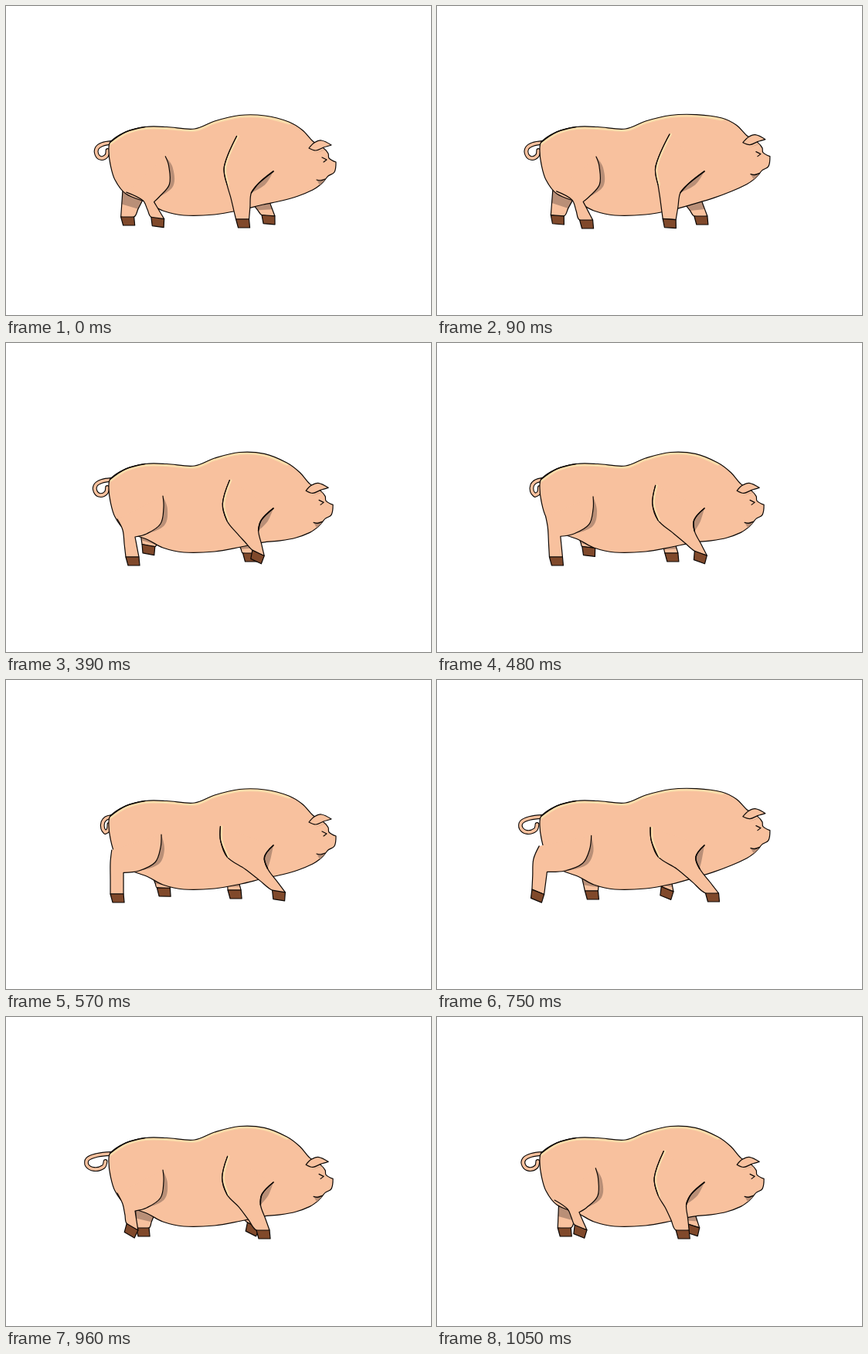
Animation, 550 px wide and 400 px high, one loop 1140 ms. Source, as an HTML page with a canvas:

```html
<!DOCTYPE html>
<html lang="en">
<head>
<meta charset="utf-8">
<title>Walking pig</title>
<style>
html, body { margin: 0; width: 100%; height: 100%; overflow: hidden; background: #fff; }
canvas { display: block; width: 550px; height: 400px; }
</style>
</head>
<body>
<canvas id="stage" width="550" height="400"></canvas>
<script>
const ctx = document.getElementById('stage').getContext('2d');
const SKIN = '#f8c19e', LIGHT = '#fbdcaa', SHADE = '#b98f77', HOOF = '#80492b', INK = '#0c0806';
const LOOP = 1140;
const STEPS = [0, 90, 210, 300, 390, 480, 570, 660, 750, 870, 960, 1050];

// The body at rest.
const BACK = [[135, 176], [155, 163], [180, 156.5], [208, 156.5], [244, 159], [270, 149], [302, 141.5], [335, 142], [366, 150], [384, 161], [397, 175]];
const FACE = [[411, 184], [417, 191], [418, 197], [427, 202], [425, 215], [417, 220], [412, 226], [406, 232], [397, 238]];
const BELLY = [[378, 246], [357, 252], [333, 257], [304, 264], [270, 270], [230, 271], [203, 265], [184, 255]];
const RUMP = [[155, 243], [141, 225], [135, 205], [133, 188]];
const EAR = [[392, 184], [399, 177], [408, 174], [421, 180], [411, 183], [401, 187]];
const EYE = [[409, 196], [415, 199], [411, 202]];
const MOUTH = [[402, 225], [407, 226], [413, 224]];

// foot: mean x, reach, step of the farthest reach, ground, lift, skew of the swing.
// Each joint is [x, x per foot shift, y, y per foot shift].
const LEGS = {
  farHind: {
    x: 181, reach: 25, peak: 6.7, ground: 284, lift: 11, skew: 0, tilt: 0.2,
    front: [[195, 0.75, 257, 0.3]],
    rear: [[171, 0.85, 247, 0.45]]
  },
  farFore: {
    x: 318, reach: 24, peak: 0.8, ground: 283, lift: 2, skew: 0, tilt: 0.5,
    front: [[321, 0.9, 257, -0.2]],
    rear: [[303, 0.75, 260, -0.15]]
  },
  hind: {
    x: 164, reach: 33, peak: 1, ground: 288, lift: 5, skew: 0.46, tilt: 0.55,
    front: [[203, 0.1, 198, -0.1], [204, 0.2, 213, -0.2], [200, 0.35, 234, -0.1], [182, 0.5, 247, 0], [167, 0.75, 251, 0.08]],
    rear: [[151, 0.8, 242, 0.3], [144, 0.36, 228, 0.4]]
  },
  fore: {
    x: 330, reach: 29, peak: 7.2, ground: 287, lift: 4, skew: 0, tilt: 0.45,
    front: [[346, 0, 214, 0], [331, 0.15, 229, 0], [328, 0.45, 243, 0.05]],
    rear: [[300, 0.4, 246, -0.05], [286, 0, 230, -0.05], [280, -0.1, 208, 0], [288, -0.45, 179, 0.45]]
  }
};

const angle = (step, peak, perLoop = 1) => 2 * Math.PI * perLoop * (step - peak) / STEPS.length;
const mix = (a, b, k) => [a[0] + (b[0] - a[0]) * k, a[1] + (b[1] - a[1]) * k];
const shift = (pts, dx, dy) => pts.map(([x, y]) => [x + dx, y + dy]);

// The head nods twice per loop; the neck eases the nod into the body.
function nod(pts, step) {
  const bob = Math.cos(angle(step, 4.5, 2));
  return pts.map(([x, y]) => {
    const t = Math.min(1, Math.max(0, (x - 310) / 90));
    const w = t * t * (3 - 2 * t) * bob;
    return [x - 4.5 * w, y + 8.5 * w];
  });
}

function tailAt(step) {
  const width = 24 - 8 * Math.cos(angle(step, 0, 2)) - 6 * Math.sin(angle(step, 1.5));
  return [[0, 177], [0.55, 179], [0.9, 184], [0.92, 192], [0.65, 197], [0.3, 194], [0.22, 187]]
    .map(([k, y]) => [136 - k * width, y]);
}

// Hoof corners: rear top, front top, front bottom, rear bottom.
function hoofAt(x, y, tilt) {
  const c = Math.cos(tilt), s = Math.sin(tilt);
  return [[-9, 0], [8, 0], [9, 11], [-6, 11]].map(([u, v]) => [x + u * c - v * s, y - 11 + u * s + v * c]);
}

function legAt(leg, step) {
  const a = angle(step, leg.peak);
  const d = leg.reach * Math.cos(a + leg.skew * Math.cos(a));
  const swing = Math.max(0, -Math.sin(a));
  const toe = Math.max(0, Math.cos(angle(step, leg.peak - 3.5)));
  const hoof = hoofAt(leg.x + d, leg.ground - leg.lift * swing, leg.tilt * toe);
  const joint = ([x, kx, y, ky]) => [x + kx * d, y + ky * d];
  const front = leg.front.map(joint), rear = leg.rear.map(joint);
  const frontAnkle = mix(front.at(-1), hoof[1], 0.55), rearAnkle = mix(rear[0], hoof[0], 0.55);
  return { front, rear, hoof, outline: [...front, frontAnkle, hoof[1], hoof[0], rearAnkle, ...rear], frontAnkle, rearAnkle };
}

// Smooth curve through points; sharp turns stay corners.
function curve(pts, closed) {
  const n = pts.length, path = new Path2D();
  const at = i => closed ? pts[(i + n) % n] : pts[Math.max(0, Math.min(n - 1, i))];
  const unit = (a, b) => {
    const d = Math.hypot(b[0] - a[0], b[1] - a[1]) || 1;
    return [(b[0] - a[0]) / d, (b[1] - a[1]) / d];
  };
  const tangent = i => {
    const u = unit(at(i - 1), at(i)), v = unit(at(i), at(i + 1));
    return u[0] * v[0] + u[1] * v[1] < 0.35 ? [0, 0] : unit(at(i - 1), at(i + 1));
  };
  path.moveTo(...pts[0]);
  for (let i = 0; i < (closed ? n : n - 1); i++) {
    const a = at(i), b = at(i + 1), s = tangent(i), e = tangent(i + 1);
    const h = Math.hypot(b[0] - a[0], b[1] - a[1]) / 3;
    path.bezierCurveTo(a[0] + s[0] * h, a[1] + s[1] * h, b[0] - e[0] * h, b[1] - e[1] * h, b[0], b[1]);
  }
  if (closed) path.closePath();
  return path;
}

function polygon(pts) {
  const path = new Path2D();
  pts.forEach(p => path.lineTo(...p));
  path.closePath();
  return path;
}

function fill(path, color) {
  ctx.fillStyle = color;
  ctx.fill(path);
}

function line(path, width = 1.2, color = INK) {
  ctx.lineWidth = width;
  ctx.strokeStyle = color;
  ctx.stroke(path);
}

function drawLeg(leg, far) {
  const skin = curve(leg.outline), hoof = polygon(leg.hoof);
  fill(skin, SKIN);
  if (far) fill(polygon([leg.front[0], leg.frontAnkle, leg.rearAnkle, leg.rear[0]]), SHADE);
  line(skin);
  fill(hoof, HOOF);
  line(hoof);
}

// Crescent to the right of a fold, widest at the middle.
function foldShade(pts, dx) {
  const inner = shift(pts.slice(1, -1), dx, 2).reverse();
  fill(curve([...pts, ...inner], true), SHADE);
}

function draw(step) {
  ctx.fillStyle = '#fff';
  ctx.fillRect(0, 0, 550, 400);
  const legs = {};
  for (const name in LEGS) legs[name] = legAt(LEGS[name], step);
  const { hind, fore } = legs;

  const tail = curve(tailAt(step));
  line(tail, 5.8);
  line(tail, 3.6, SKIN);
  drawLeg(legs.farHind, true);
  drawLeg(legs.farFore, true);

  const back = nod(BACK, step), face = nod(FACE, step);
  const body = curve([...back, ...face, ...nod(BELLY, step), ...RUMP], true);
  fill(body, SKIN);
  ctx.save();
  ctx.clip(body);
  line(curve(back.slice(0, 9)), 7, LIGHT);
  ctx.restore();
  line(body);
  line(curve(back.slice(0, 3)), 1.6);

  foldShade(hind.front.slice(0, 4), 5);
  drawLeg(hind);
  foldShade(fore.front, 8);
  drawLeg(fore);
  const shoulder = fore.rear.slice(1);
  line(curve(shift(shoulder, 2, 0)), 2.4, LIGHT);
  line(curve(shoulder));
  line(curve(fore.front), 1.6);

  const mouth = nod(MOUTH, step), ear = nod(EAR, step);
  fill(polygon([mouth[0], mouth[2], face[6], face[7]]), SHADE);
  line(curve(mouth));
  line(curve(nod(EYE, step)));
  fill(polygon(shift(ear.slice(3), -2, 4)), SHADE);
  const flap = curve(ear, true);
  fill(flap, SKIN);
  line(flap);
}

ctx.lineJoin = ctx.lineCap = 'round';
const start = performance.now();
let shown = -1;
function tick() {
  const t = (performance.now() - start) % LOOP;
  const step = STEPS.findLastIndex(s => s <= t);
  if (step !== shown) draw(shown = step);
  requestAnimationFrame(tick);
}
tick();
</script>
</body>
</html>
```
